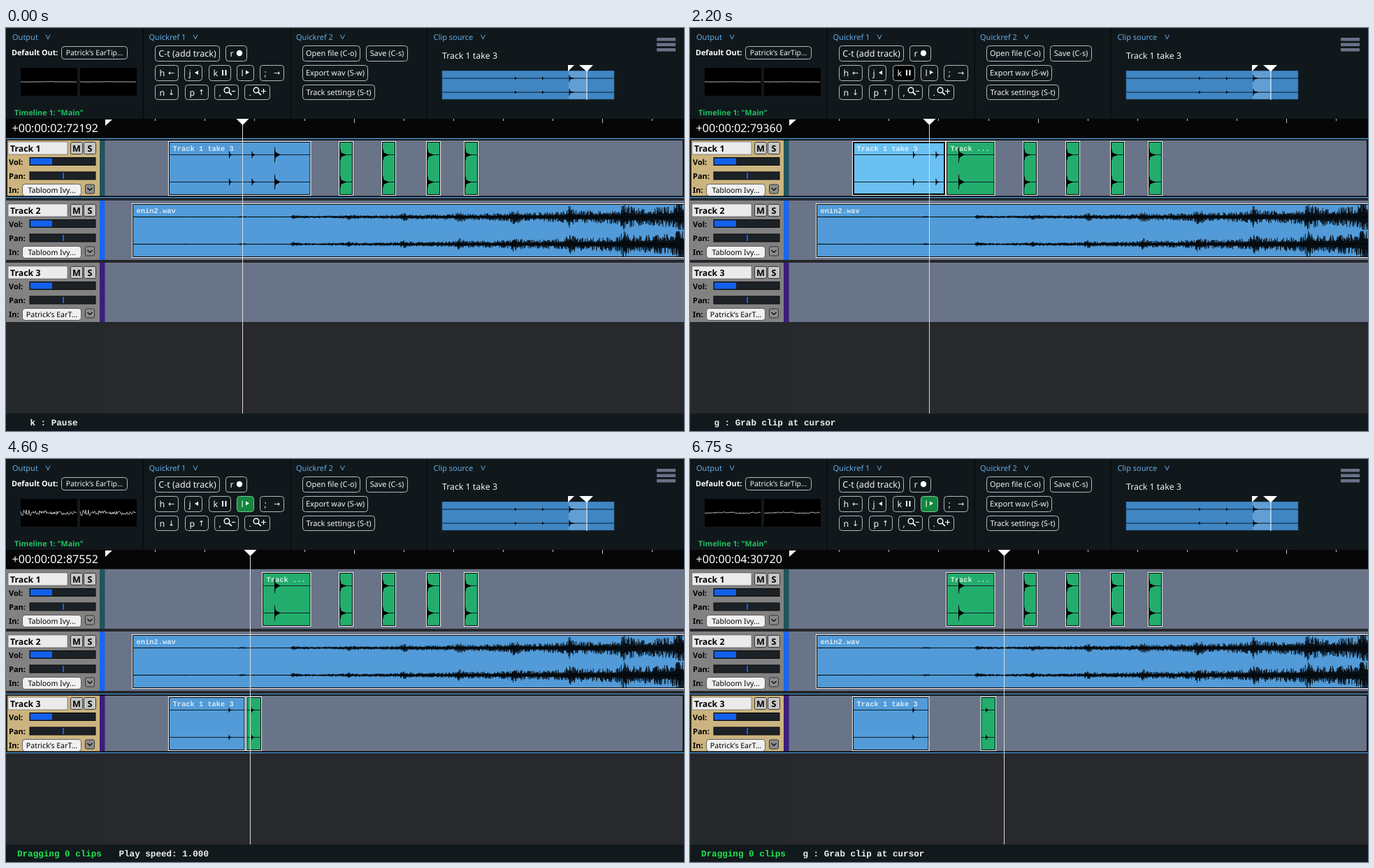
Write an HTML page that moves like this. It is 970 by 577 pixels and loops after 6.8 s.

```html
<!DOCTYPE html>
<html lang="en">
<head>
<meta charset="utf-8">
<title>Audio timeline</title>
<style>
  html, body { margin: 0; width: 100%; height: 100%; overflow: hidden; background: #28292c; }
  svg { display: block; text-rendering: geometricPrecision; }
  text { font-family: "Noto Sans", "Open Sans", sans-serif; white-space: pre; }
  .mono { font-family: "Liberation Mono", "DejaVu Sans Mono", monospace; font-weight: bold; }
  .bold { font-weight: bold; }
  .arrow { font-family: "DejaVu Sans", sans-serif; }
</style>
</head>
<body>
<svg id="stage" width="970" height="577" viewBox="0 0 970 577"></svg>
<script>
const LOOP = 6800, TICK = 50;
const RATE = 96000, BLOCK = 512;
const ORIGIN = 142.6, PX_PER_SEC = 71.1, START = 2.752;
const CUT_1 = 1250, GRAB_1 = 2200, DOWN_1 = 2700, DOWN_2 = 2950, DROP_1 = 3300;
const CUT_2 = 4250, GRAB_2 = 4900, DROP_2 = 6400;
const BLUE = '#529bd8', BLUE_LIT = '#6bc0f2', GREEN = '#23ad6d', GREEN_LIT = '#2fdb85';

// start ms, play speed, status message, lit keys, dragged clips
const STEPS = [
  [0, 0, 'k : Pause', ''],
  [410, 1, 'Play speed: 1.000', 'l'],
  [900, -1, 'Play speed: -1.000', 'jkl'],
  [1000, 0, 'k : Pause', 'jk'],
  [CUT_1, 0, 'c : Cut', 'k'],
  [1600, -1, 'Play speed: -1.000', 'j'],
  [1916, 0, 'k : Pause', 'k'],
  [GRAB_1, 0, 'g : Grab clip at cursor', 'k'],
  [GRAB_1 + 50, 0, 'g : Grab clip at cursor', '', 1],
  [DOWN_1, 0, 'n : Next track', 'n', 1],
  [DOWN_2, 0, 'n : Next track', 'n', 1],
  [DROP_1, 0, 'g : Grab clip at cursor', '', 0],
  [3590, -1, 'Play speed: -1.000', 'j', 0],
  [3750, 0, 'k : Pause', 'jk', 0],
  [3950, 1, 'Play speed: 1.000', 'l', 0],
  [4103, 0, 'k : Pause', 'k', 0],
  [CUT_2, 0, 'c : Cut', '', 0],
  [4508, 1, 'Play speed: 1.000', 'l', 0],
  [4648, 0, 'k : Pause', 'k', 0],
  [GRAB_2, 0, 'g : Grab clip at cursor', '', 1],
  [5387, 1, 'Play speed: 1.000', 'l', 1],
  [DROP_2, 1, 'g : Grab clip at cursor', 'l', 0]
];

const stage = document.getElementById('stage');

function el(tag, attrs, parent = stage) {
  const node = document.createElementNS('http://www.w3.org/2000/svg', tag);
  set(node, attrs);
  parent.appendChild(node);
  return node;
}
function set(node, attrs) {
  for (const key in attrs) node.setAttribute(key, attrs[key]);
}
const rect = (x, y, width, height, fill, parent, more = {}) =>
  el('rect', { x, y, width, height, fill, ...more }, parent);
const path = (d, fill, parent, more = {}) => el('path', { d, fill, ...more }, parent);
const line = (d, stroke, parent, width = 1) =>
  path(d, 'none', parent, { stroke, 'stroke-width': width });
function text(str, x, y, size, fill, parent, more = {}) {
  const node = el('text', { x, y, fill, 'font-size': size, ...more }, parent);
  node.textContent = str;
  return node;
}
const frame = (x0, y0, x1, y1, stroke, parent, width = 1) =>
  rect(x0, y0, x1 - x0, y1 - y0, 'none', parent, { stroke, 'stroke-width': width });
const show = (node, on) => node.setAttribute('visibility', on ? 'inherit' : 'hidden');

function noise(n) {
  const v = Math.sin(n * 127.1 + 11.7) * 43758.5453;
  return v - Math.floor(v);
}

// ---------- header ----------
rect(0, 0, 970, 577, '#28292c');
rect(0, 130, 142, 422, '#25292c');
rect(0, 0, 970, 130, '#11181c');
[195.5, 406.5, 601.5].forEach(x => rect(x, 0, 1.2, 130, '#05080b'));

function panelTitle(str, x, chevron) {
  text(str, x, 16.5, 11, '#62abe6');
  line(`M${chevron} 9.5l3 6.5l3 -6.5`, '#62abe6');
}
panelTitle('Output', 9, 57);
panelTitle('Quickref 1', 204.5, 268);
panelTitle('Quickref 2', 415, 478.5);
panelTitle('Clip source', 611.5, 679.5);

function button(x0, y0, x1, y1) {
  return rect(x0 + .5, y0 + .5, x1 - x0 - 1, y1 - y0 - 1, '#11181c', stage,
    { rx: 4, stroke: '#b4b8ba', 'stroke-width': 1 });
}
function labelButton(str, x0, y0, x1, y1, size) {
  button(x0, y0, x1, y1);
  text(str, (x0 + x1) / 2, (y0 + y1) / 2 + size * .35, size, '#f4f4f4', stage, { 'text-anchor': 'middle' });
}
text('Default Out:', 8, 39, 10.8, '#fff', stage, { class: 'bold' });
labelButton('Patrick’s EarTip...', 79, 26, 174, 45, 10.4);
labelButton('C-t (add track)', 213, 25, 306, 48, 12.6);
labelButton('Open file (C-o)', 424, 25, 507, 48, 10.9);
labelButton('Save (C-s)', 515, 25, 575, 48, 10.9);
labelButton('Export wav (S-w)', 424, 53, 518, 76, 10.9);
labelButton('Track settings (S-t)', 424, 81, 528, 103, 10.9);

const keys = {};
function key(name, x0, y0, x1, y1, arrow) {
  keys[name] = button(x0, y0, x1, y1);
  text(name, x0 + 6.5, y0 + 15.5, 12.5, '#f4f4f4');
  if (arrow) text(arrow, x1 - 15, y0 + 15, 11, '#f4f4f4', stage, { class: 'arrow' });
}
key('r', 314, 25, 345, 48);
el('circle', { cx: 334, cy: 36, r: 4.2, fill: '#fff' });
key('h', 213, 53, 247, 76, '←');
key('j', 255, 53, 281, 76);
path('M275 61v6l-5 -3z', '#fff');
key('k', 290, 53, 322, 76);
path('M309 60h2v8h-2zM313.5 60h2v8h-2z', '#fff');
key('l', 330, 53, 355, 76);
path('M343 60.5v6l5 -3z', '#fff');
key(';', 363, 53, 398, 76, '→');
key('n', 213, 81, 247, 103, '↓');
key('p', 256, 81, 290, 103, '↑');
key(',', 298, 81, 333, 103);
key('.', 341, 81, 378, 103);
function lens(x, sign) {
  el('circle', { cx: x, cy: 89, r: 3.8, fill: 'none', stroke: '#fff', 'stroke-width': 1.4 });
  line(`M${x + 2.8} 91.8l4 4`, '#fff', stage, 1.8);
  line(sign, '#fff', stage, 1.2);
}
lens(316, 'M323 90.5h5');
lens(358, 'M365 90.5h7M368.5 87v7');
[14, 21.5, 29].forEach(y => rect(931, y, 27, 4.5, '#6a7288'));

rect(21, 57, 81, 40, '#000');
rect(106, 57, 81, 40, '#000');
const scopes = [21, 106].map(() => line('', '#b0b0b0', stage, 1));
text('Timeline 1: "Main"', 12, 125, 10.8, '#21c063', stage, { class: 'bold' });

// ---------- waveforms ----------
// a thin attack at x with a short decay
function blip(x, y, amp, len) {
  const a = amp * .42;
  return `M${x} ${y - amp}h.7L${x + 1.4} ${y - a}Q${x + len * .4} ${y - a * .5} ${x + len} ${y}` +
    `Q${x + len * .4} ${y + a * .5} ${x + 1.4} ${y + a}L${x + .7} ${y + amp}h-.7z`;
}

text('Track 1 take 3', 624, 44, 12.3, '#f4f4f4');
rect(624, 61, 246, 41, '#4086c3');
rect(805, 61, 26, 41, '#619ed3');
[72, 92].forEach(y => {
  rect(624, y - .5, 246, 1, '#0b1a28');
  path(blip(728, y, 2, 4) + blip(767, y, 2, 4) + blip(805.5, y, 5, 8), '#000');
});
frame(624, 61.5, 870, 102, '#2a5d8a', stage, .5);
path('M804 53h9l-9 9zM820 53h20l-9 9.5z', '#fff');
rect(830.5, 61, 1, 42, '#fff');

// ---------- ruler ----------
rect(0, 130, 970, 27, '#060606');
for (let s = 1; s < 12; s++)
  rect(Math.floor(ORIGIN + s * PX_PER_SEC), 130, 1, s % 5 ? 3 : 6, '#c8c8c8');
path('M142 131h10l-10 9z', '#fff');
const clock = text('', 8.5, 148.5, 16.1, '#fff');

// ---------- tracks ----------
const trackTop = i => 158 + 89 * i;
const INPUTS = ['Tabloom Ivy...', 'Tabloom Ivy...', 'Patrick’s EarT...'];
const STRIPS = ['#20555d', '#1a66ee', '#3c1d7c'];

function makeTrack(i) {
  const g = el('g', { transform: `translate(0 ${trackTop(i)})` });
  const bold = { class: 'bold' };
  rect(0, -1, 970, 90, '#25272a', g);
  rect(141, 0, 829, 85, '#6a7489', g);
  const head = rect(0, 0, 134, 85, '#828282', g);
  rect(134, 0, 7.5, 85, STRIPS[i], g);
  const mark = el('g', {}, g);
  rect(0, 0, 970, 1.2, '#4ea2e6', mark);
  rect(0, 84, 970, 1.2, '#4ea2e6', mark);
  frame(1, 2, 969, 83.2, '#000', mark, 1.6);

  rect(3, 5, 85, 18, '#ebebeb', g, { stroke: '#555', 'stroke-width': .6 });
  text('Track ' + (i + 1), 6, 18.5, 12.3, '#000', g, bold);
  [['M', 92], ['S', 111]].forEach(([c, x]) => {
    rect(x + .5, 5.5, 17, 17, '#c6c6c6', g, { rx: 2, stroke: '#333' });
    text(c, x + 9, 19, 12.5, '#000', g, { class: 'bold', 'text-anchor': 'middle' });
  });
  ['Vol:', 'Pan:', 'In:'].forEach((s, n) => text(s, 4, 38 + n * 20.2, 11, '#000', g, bold));
  [27.5, 48].forEach(y => rect(34, y, 94, 11, '#1c2126', g, { stroke: '#0a0a0a', 'stroke-width': 1 }));
  rect(35, 28.5, 31, 9, '#1261ec', g);
  rect(81, 49, 2, 9, '#1261ec', g);
  rect(23.5, 65.5, 84, 17, '#f0f0f0', g, { rx: 4, stroke: '#444', 'stroke-width': .8 });
  text(INPUTS[i], 65.5, 78, 10.6, '#000', g, { 'text-anchor': 'middle' });
  rect(113.5, 66, 13, 13, '#8c8c8c', g, { rx: 2, stroke: '#333' });
  line('M116.5 71l3.5 3.5l3.5 -3.5', '#000', g, 1.2);
  return { head, mark };
}
const tracks = [0, 1, 2].map(makeTrack);

// ---------- clips ----------
const CHANNELS = [23.5, 62.5];
const TAP_1 = [319, 5, 5], TAP_2 = [351.5, 5, 6], KNOCK = [384, 11, 9];

function makeClip(x0, x1, color, label, hits) {
  const g = el('g', {});
  const body = rect(x0, 4, x1 - x0, 78, color, g);
  const edge = frame(x0 + 1.5, 5.5, x1 - 1.5, 80.5, '#000', g);
  frame(x0 + .5, 4.5, x1 - .5, 81.5, '#f2f2f2', g);
  CHANNELS.forEach(y => {
    rect(x0 + 1, y - .5, x1 - x0 - 2, 1, '#10202c', g);
    hits.forEach(([x, amp, len]) => path(blip(x, y, amp, len), '#000', g));
  });
  text(label, x0 + 6.5, 18, 10.4, 'rgba(255,255,255,.78)', g, { class: 'mono' });
  return { g, body, edge };
}
const place = (clip, track, dx = 0) =>
  clip.g.setAttribute('transform', `translate(${dx} ${trackTop(track)})`);
function light(clip, on, plain, lit) {
  clip.body.setAttribute('fill', on ? lit : plain);
  clip.edge.setAttribute('stroke-width', on ? 3 : 1);
}

[476, 537, 601, 655].forEach(x =>
  place(makeClip(x, x + 21, GREEN, '', [[x + 2, 8, 10]]), 0));

// a slow swell with a burst on every beat
function level(x) {
  if (x < 408) return x > 333 && x < 343 ? 1.1 : .5;
  const beats = (x - 411) / 78.9;
  const away = (beats - Math.round(beats)) * 78.9;
  const swell = 1.3 * Math.exp((x - 411) / 240);
  return swell * (1 + 1.2 * Math.exp(-Math.abs(away) / (away < 0 ? 3 : 6)));
}
const song = makeClip(180, 975, BLUE, 'enin2.wav', []);
CHANNELS.forEach((y, c) => {
  let d = '';
  for (let x = 182; x < 970; x += .6) {
    const n = x * 3.1 + c * 977;
    const reach = k => Math.min(18.5, level(x) * (.35 + .9 * noise(n + k) ** 2));
    const up = reach(0), down = reach(.5);
    d += `M${x.toFixed(1)} ${(y - up).toFixed(1)}v${(up + down).toFixed(1)}`;
  }
  line(d, '#000', song.g, .9);
});
place(song, 1);

const whole = makeClip(232, 436.5, BLUE, 'Track 1 take 3', [TAP_1, TAP_2, KNOCK]);
const tail = makeClip(366, 436.5, GREEN, 'Track ...', [KNOCK]);
const front = makeClip(232, 366, BLUE, 'Track 1 take 3', [TAP_1, TAP_2]);
const left = makeClip(232, 342.5, BLUE, 'Track 1 take 3', [[318.5, 3.5, 5]]);
const right = makeClip(343.5, 366, GREEN, '', [[351, 3.5, 6]]);
place(whole, 0);
place(tail, 0);
place(left, 2);

// ---------- playhead and status bar ----------
const head = el('g', {});
rect(0, 131, 1, 421, '#dcdcdc', head);
path('M-8.5 130h18l-9 9z', '#fff', head);
rect(0, 552, 970, 25, '#12191c');
const dragText = text('', 16, 568.5, 12.6, '#22e350', stage, { class: 'mono' });
const message = text('', 35, 568.5, 12.6, '#f0f0f0', stage, { class: 'mono' });

// ---------- motion ----------
function secondsAt(t) {
  return STEPS.reduce((s, [from, speed], i) => {
    const to = i + 1 < STEPS.length ? STEPS[i + 1][0] : LOOP;
    return s + speed * Math.max(0, Math.min(t, to) - from) / 1000;
  }, START);
}

function timecode(s) {
  const n = Math.round(s * RATE / BLOCK) * BLOCK;
  const pad = (v, len) => String(v).padStart(len, '0');
  return `+00:00:${pad(Math.floor(n / RATE), 2)}:${pad(n % RATE, 5)}`;
}

function drawScopes(t, x, playing) {
  let amp = .3, burst = 0;
  if (playing) {
    amp = 1.2;
    for (const [hit] of [TAP_1, TAP_2, KNOCK]) burst += 6 * Math.exp(-Math.abs(x - hit + 1.5) / 3);
  }
  scopes.forEach((node, c) => {
    let d = '';
    for (let i = 0; i <= 80; i++) {
      const a = amp + burst * (.35 + .65 * Math.exp(-Math.abs(i - 8) / 9));
      const y = 77 + a * (noise(i + t * .37) - .5) * 1.7 + Math.sin(i / 9 + t) * amp * .4;
      d += `${i ? 'L' : 'M'}${(c ? 106 : 21) + i} ${y.toFixed(2)}`;
    }
    node.setAttribute('d', d);
  });
}

function draw(t) {
  const at = STEPS.findLastIndex(step => step[0] <= t);
  const [, speed, msg, lit, drag] = STEPS[at];
  const s = secondsAt(t);

  // the drawn head settles slightly past the clock when stopped
  const moved = STEPS.slice(0, at).reverse().find(step => step[1]);
  const settle = speed ? 0 : moved && moved[1] < 0 ? -1.5 : .3;
  const x = ORIGIN + s * PX_PER_SEC + settle;
  head.setAttribute('transform', `translate(${Math.floor(x)} 0)`);
  clock.textContent = timecode(s);

  for (const name in keys) {
    const on = lit.includes(name), play = on && name === 'l';
    set(keys[name], { fill: play ? '#12873e' : on ? '#000' : '#11181c', stroke: play ? '#7fc496' : '#b4b8ba' });
  }

  const sel = t < DOWN_1 ? 0 : t < DOWN_2 ? 1 : 2;
  tracks.forEach((track, i) => {
    track.head.setAttribute('fill', i === sel ? '#cbb480' : '#828282');
    show(track.mark, i === sel);
  });

  show(whole.g, t < CUT_1);
  show(tail.g, t >= CUT_1);
  show(front.g, t >= CUT_1 && t < CUT_2);
  show(left.g, t >= CUT_2);
  show(right.g, t >= CUT_2);
  place(front, sel);
  light(front, t >= GRAB_1 && t < DROP_1, BLUE, BLUE_LIT);
  const carried = secondsAt(Math.min(t, DROP_2)) - secondsAt(GRAB_2);
  place(right, 2, t < GRAB_2 ? 0 : Math.floor(carried * PX_PER_SEC));
  light(right, t >= GRAB_2 && t < DROP_2, GREEN, GREEN_LIT);

  const dragging = drag !== undefined;
  dragText.textContent = dragging ? `Dragging ${drag} clips` : '';
  message.textContent = msg;
  message.setAttribute('x', dragging ? 161.5 : 34.5);
  drawScopes(t, x, speed);
}

const begin = performance.now();
function tick() {
  const t = (performance.now() - begin) % LOOP;
  draw(Math.floor(t / TICK) * TICK);
  requestAnimationFrame(tick);
}
tick();
</script>
</body>
</html>
```
